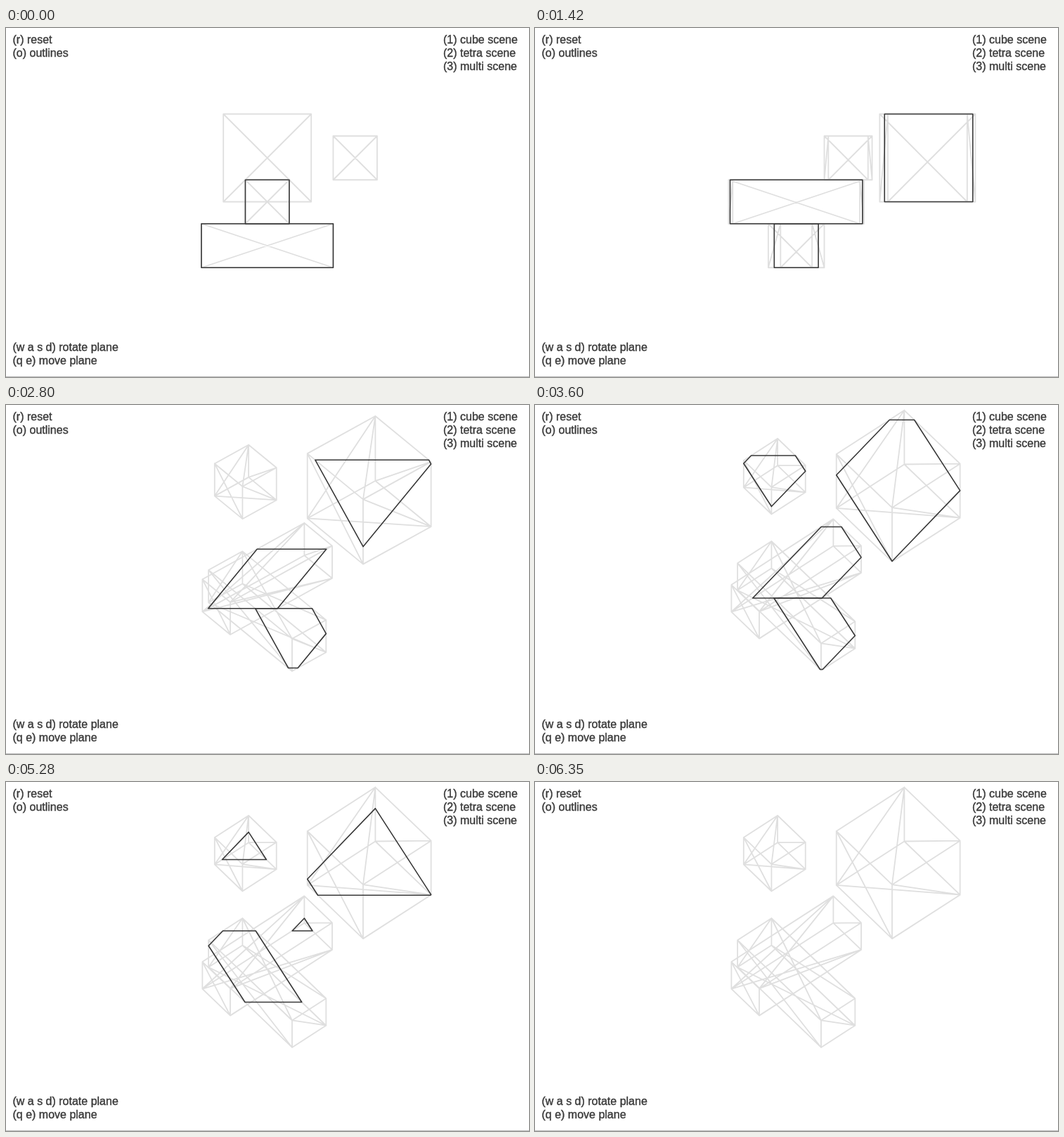
An HTML page with a canvas that plays this animation: 744x497 px, repeating every 6700 ms.

```html
<!DOCTYPE html>
<html lang="en">
<head>
<meta charset="utf-8">
<title>Slicing plane</title>
<style>
  html, body { margin: 0; width: 100%; height: 100%; overflow: hidden; background: #fff; }
  body { position: relative; font: 16px/19px "Liberation Sans", Arial, sans-serif; color: #3a3a3a; }
  canvas { position: absolute; left: 0; top: 0; width: 744px; height: 497px; }
  p { position: absolute; margin: 0; white-space: pre; -webkit-text-stroke: 0.4px #3a3a3a; }
  .view { left: 9.5px; top: 7px; }
  .scenes { left: 622px; top: 7px; }
  .plane { left: 9.5px; top: 445px; }
  hr { position: absolute; left: 0; top: 496px; width: 744px; height: 1px; margin: 0; border: 0; background: #bbb; }
</style>
</head>
<body>
<canvas></canvas>
<p class="view">(r) reset
(o) outlines</p>
<p class="scenes">(1) cube scene
(2) tetra scene
(3) multi scene</p>
<p class="plane">(w a s d) rotate plane
(q e) move plane</p>
<hr>
<script>
const LOOP = 6700, STEP = 30, UNIT = 31.25, CX = 371.7, CY = 247.5;
const WIRE = { color: '#dfdfdf', width: 1.8 };
const CUT = { color: '#383838', width: 1.6 };

const BOXES = [
  { at: [0, 2, 6], half: [2, 2, 2] },
  { at: [4, 2, 2], half: [1, 1, 1] },
  { at: [0, 0, 0], half: [1, 1, 3] },
  { at: [0, -2, 0], half: [3, 1, 1] }
];

// Corner bits: 1 = +x, 2 = +y, 4 = +z. Edges flip one bit, face diagonals two.
const EDGES = [];
for (let i = 0; i < 8; i++)
  for (const bit of [1, 2, 4]) if (!(i & bit)) EDGES.push([i, i | bit]);
const DIAGONALS = [[7, 1], [5, 6], [3, 0], [2, 4], [7, 2], [1, 4]];

const canvas = document.querySelector('canvas');
const ctx = canvas.getContext('2d');
const dpr = window.devicePixelRatio || 1;
canvas.width = 744 * dpr;
canvas.height = 497 * dpr;
ctx.scale(dpr, dpr);
ctx.lineJoin = ctx.lineCap = 'round';

// Linear progress 0..1 in fixed steps that land exactly on the end
function sweep(t, start, end) {
  const stepped = end - Math.ceil((end - t) / STEP) * STEP;
  return Math.min(1, Math.max(0, (stepped - start) / (end - start)));
}

function makeView(yaw, pitch) {
  const rad = Math.PI / 180;
  const cy = Math.cos(yaw * rad), sy = Math.sin(yaw * rad);
  const cp = Math.cos(pitch * rad), sp = Math.sin(pitch * rad);
  return (x, y, z) => {
    const depth = z * cy - x * sy;
    return {
      x: CX + UNIT * (x * cy + z * sy),
      y: CY - UNIT * (y * cp - depth * sp),
      z: y * sp + depth * cp
    };
  };
}

function corners({ at, half }, view) {
  return Array.from({ length: 8 }, (_, i) =>
    view(...at.map((c, axis) => c + (i >> axis & 1 ? half[axis] : -half[axis]))));
}

function drawWire(pts) {
  ctx.beginPath();
  for (const [a, b] of [...EDGES, ...DIAGONALS]) {
    ctx.moveTo(pts[a].x, pts[a].y);
    ctx.lineTo(pts[b].x, pts[b].y);
  }
  ctx.stroke();
}

function drawSlice(pts, depth) {
  const cut = [];
  for (const [i, j] of EDGES) {
    const a = pts[i], b = pts[j];
    if ((a.z < depth) === (b.z < depth)) continue;
    const k = (depth - a.z) / (b.z - a.z);
    cut.push({ x: a.x + (b.x - a.x) * k, y: a.y + (b.y - a.y) * k });
  }
  if (!cut.length) return;
  const mx = cut.reduce((sum, p) => sum + p.x, 0) / cut.length;
  const my = cut.reduce((sum, p) => sum + p.y, 0) / cut.length;
  const angle = p => Math.atan2(p.y - my, p.x - mx);
  cut.sort((p, q) => angle(p) - angle(q));
  ctx.beginPath();
  for (const p of cut) ctx.lineTo(p.x, p.y);
  ctx.closePath();
  ctx.stroke();
}

function setPen({ color, width }) {
  ctx.strokeStyle = color;
  ctx.lineWidth = width;
}

function draw(t) {
  const yaw = 129.35 * sweep(t, 340, 1990);
  const pitch = 52 * sweep(t, 2270, 2920);
  // The plane backs out behind the solids, then passes through to the front
  const depth = 6.76 * sweep(t, 4825, 6330) - 4.2 * sweep(t, 3465, 4440);
  const view = makeView(yaw, pitch);
  const solids = BOXES.map(box => corners(box, view));
  ctx.clearRect(0, 0, 744, 497);
  setPen(WIRE);
  solids.forEach(drawWire);
  setPen(CUT);
  solids.forEach(pts => drawSlice(pts, depth));
}

const begin = performance.now();
function tick() {
  draw((performance.now() - begin) % LOOP);
  requestAnimationFrame(tick);
}
tick();
</script>
</body>
</html>
```
